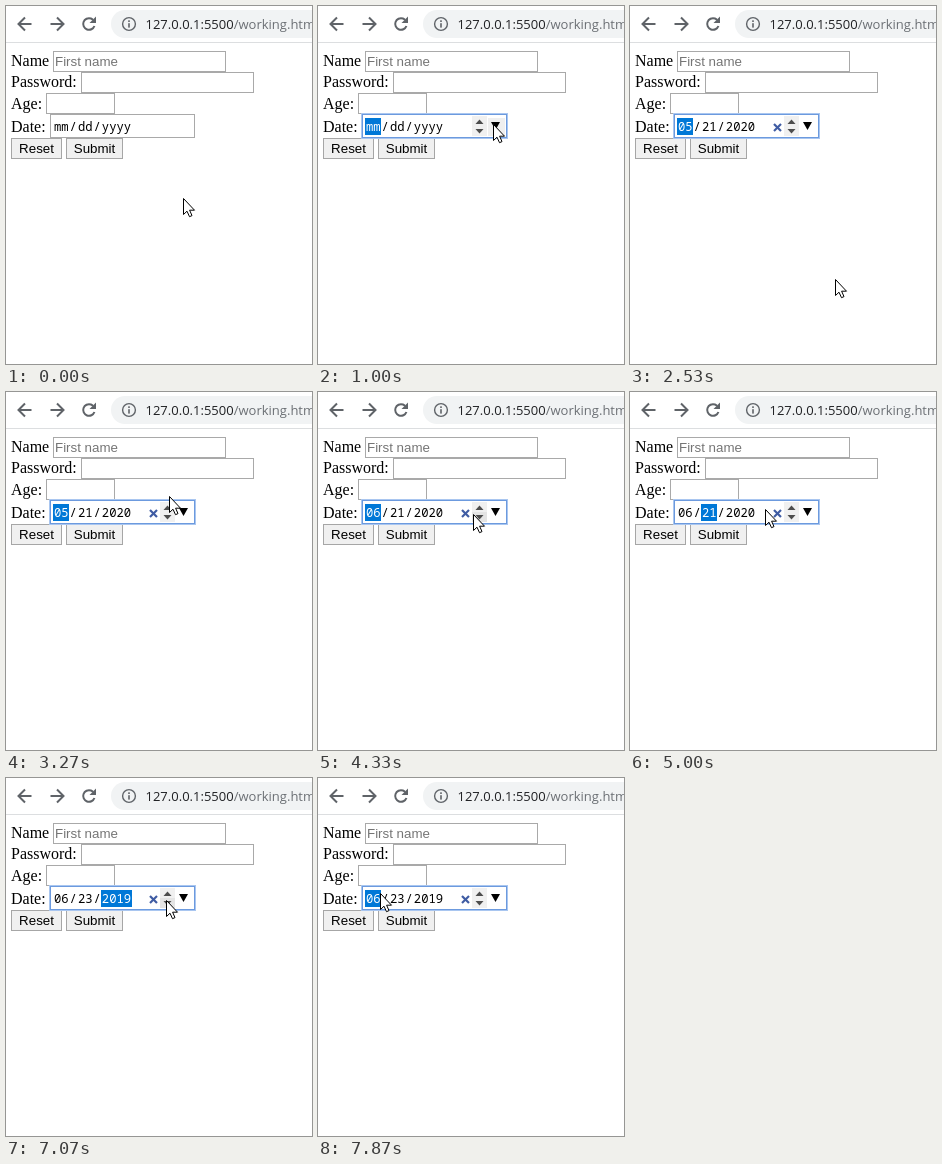
These frames come from a looping animation (306 px wide and 358 px high, 8 s). An HTML page with a canvas:

```html
<!DOCTYPE html>
<html lang="en">
<head>
<meta charset="utf-8">
<title>Date input</title>
<style>
html, body { margin: 0; width: 100%; height: 100%; overflow: hidden; background: #fff; }
canvas { display: block; width: 306px; height: 358px; }
</style>
</head>
<body>
<canvas id="stage" width="306" height="358"></canvas>
<script>
const ctx = document.getElementById('stage').getContext('2d');
const TICK = 200 / 3, TICKS = 120;
const SERIF = '16px "Liberation Serif", serif';
const SANS = '13.33px "Liberation Sans", sans-serif';
const SMALL = '12px "Liberation Sans", sans-serif';
const MONO = '12.2px "Noto Sans Mono", monospace';
const URL_FONT = '13px "Open Sans", sans-serif';
const INK = '#5f6368';

// Pointer strokes; each starts where the one before ended
const strokes = [
  { from: 0, to: 5, x: 171, y: 124 },
  { from: 8, to: 14, x: 175, y: 118 },
  { from: 20, to: 28, x: 198, y: 265 },
  { from: 28, to: 31, x: 205, y: 273 },
  { from: 42, to: 47, x: 164, y: 101 },
  { from: 48, to: 51, x: 160, y: 113 },
  { from: 60, to: 61, x: 160, y: 117 },
  { from: 64, to: 71, x: 75, y: 118, dip: 11 },
  { from: 72, to: 77, x: 167, y: 117 },
  { from: 80, to: 86, x: 161, y: 116 },
  { from: 89, to: 97, x: 114, y: 119 },
  { from: 99, to: 103, x: 160, y: 122 },
  { from: 106, to: 112, x: 66, y: 116, dip: 10 },
  { from: 116, to: 118, x: 62, y: 115 }
];
// What a click does follows from where the pointer is
const clicks = [14, 36, 54, 73, 81, 84, 98, 104, 117];
const OPEN_DELAY = 3, RELEASE = 2;

const inside = (p, x, y, w, h) => p.x >= x && p.x < x + w && p.y >= y && p.y < y + h;
const ease = u => u * u * (3 - 2 * u);

function pointerAt(tick) {
  let x = 177, y = 192;
  for (const s of strokes) {
    if (tick <= s.from) break;
    const u = Math.min(1, (tick - s.from) / (s.to - s.from));
    x += (s.x - x) * ease(u);
    y += (s.y - y) * ease(u) + (s.dip || 0) * Math.sin(Math.PI * u);
  }
  return { x: Math.round(x), y: Math.round(y) };
}

function stateAt(tick) {
  const state = { date: null, part: -1, open: false, picking: false, pressed: false };
  for (const t of clicks.filter(c => c <= tick)) {
    const p = pointerAt(t), age = tick - t;
    state.pressed = age < RELEASE;
    if (p.y > 132) {
      state.picking = state.pressed;
      state.open = state.pressed;
      if (!state.pressed) state.date = [5, 21, 2020];
    } else if (p.x >= 170) {
      state.part = 0;
      state.open = age >= OPEN_DELAY;
    } else if (p.x >= 154) {
      state.date[state.part] += p.y < 120 ? 1 : -1;
    } else {
      state.part = Math.min(2, Math.floor((p.x - 43) / 24));
    }
  }
  return state;
}

function rect(x, y, w, h, fill, border) {
  if (fill) { ctx.fillStyle = fill; ctx.fillRect(x, y, w, h); }
  if (border) {
    ctx.strokeStyle = border;
    ctx.lineWidth = 1;
    ctx.strokeRect(x + 0.5, y + 0.5, w - 1, h - 1);
  }
}

function text(str, x, y, font, color = '#000', align = 'left') {
  ctx.font = font;
  ctx.fillStyle = color;
  ctx.textAlign = align;
  ctx.fillText(str, x, y);
  return ctx.measureText(str).width;
}

function trace(points) {
  ctx.beginPath();
  points.forEach(([x, y]) => ctx.lineTo(x, y));
}

function poly(points, fill) {
  trace(points);
  ctx.closePath();
  ctx.fillStyle = fill;
  ctx.fill();
}

function line(points, color, width) {
  trace(points);
  ctx.strokeStyle = color;
  ctx.lineWidth = width;
  ctx.stroke();
}

// Triangles centred on x or y; a negative size flips them
const wedgeY = (x, y, half, h, fill) => poly([[x - half, y], [x + half, y], [x, y + h]], fill);
const wedgeX = (x, y, half, w, fill) => poly([[x, y - half], [x, y + half], [x + w, y]], fill);

function drawArrow(x, dir) {
  line([[x - 6.5 * dir, 18], [x + 6 * dir, 18]], INK, 2);
  line([[x, 11.5], [x + 6.5 * dir, 18], [x, 24.5]], INK, 2);
}

function drawToolbar() {
  drawArrow(19, -1);
  drawArrow(51, 1);

  ctx.beginPath();
  ctx.arc(83, 18, 5.8, 0.35, Math.PI * 1.75);
  ctx.stroke();
  poly([[90, 10.5], [90, 17], [83.5, 17]], INK);

  ctx.beginPath();
  ctx.roundRect(105, 4, 260, 28, 14);
  ctx.fillStyle = '#f1f3f4';
  ctx.fill();

  ctx.beginPath();
  ctx.arc(123, 18, 6.4, 0, Math.PI * 2);
  ctx.lineWidth = 1.4;
  ctx.stroke();
  rect(122.2, 14.3, 1.6, 1.7, INK);
  rect(122.2, 17.2, 1.6, 4.4, INK);

  const hostWidth = text('127.0.0.1:5500', 139.5, 23, URL_FONT, '#202124');
  text('/working.htm', 139.5 + hostWidth, 23, URL_FONT, '#6b6f74');
  rect(0, 36, 306, 1, '#dcdee0');
}

function drawButton(label, x, w) {
  rect(x, 132, w, 21, '#f0f0f0', '#a6a6a6');
  text(label, x + w / 2, 147, SANS, '#000', 'center');
}

function drawForm() {
  const border = '#a9a9a9';
  text('Name', 5, 60, SERIF);
  text('Password:', 5, 81, SERIF);
  text('Age:', 5, 103, SERIF);
  text('Date:', 5, 126, SERIF);
  rect(47, 45, 173, 21, '#fff', border);
  rect(75, 66, 173, 21, '#fff', border);
  rect(40, 87, 69, 21, '#fff', border);
  rect(44, 108, 145, 24, '#fff', border);
  text('First name', 49, 60, SANS, '#757575');
  drawButton('Reset', 5, 51);
  drawButton('Submit', 60, 57);
}

function drawDateText({ date, part }) {
  const parts = date
    ? date.map(n => String(n).padStart(2, '0'))
    : ['mm', 'dd', 'yyyy'];
  let x = 47;
  parts.forEach((str, i) => {
    ctx.font = MONO;
    const w = ctx.measureText(str).width + 2;
    if (i === part) rect(Math.round(x), 112, Math.floor(w), 17, '#0078d7');
    text(str, x + 1, 125, MONO, i === part ? '#fff' : '#000');
    x += w;
    if (i < 2) x += text('/', x, 125, MONO);
  });
}

function drawFieldControls(p, { date, open, pressed }) {
  if (date) {
    line([[144, 118], [151, 125]], '#3f5ca3', 2.2);
    line([[151, 118], [144, 125]], '#3f5ca3', 2.2);
  }
  for (const y of [110, 120]) {
    const hover = !open && inside(p, 154, y, 15, 10);
    rect(154, y, 15, 10, hover ? (pressed ? '#cfcfcf' : '#e4e4e4') : '#f0f0f0');
  }
  wedgeY(161.5, 118, 4, -4.5, '#4d4d4d');
  wedgeY(161.5, 123, 4, 4.5, '#4d4d4d');
  if (!open && inside(p, 170, 110, 17, 20)) rect(170, 112, 17, 18, '#efefef');
  wedgeY(177.5, 116, 4.5, 8, '#000');
}

function drawDateField(p, state) {
  const focused = state.part >= 0;
  if (focused) {
    rect(43, 107, 147, 26, null, '#a9c6f0');
    rect(44, 108, 145, 24, null, '#6c9ade');
  }
  drawDateText(state);
  if (focused || inside(p, 44, 108, 145, 24)) drawFieldControls(p, state);
}

function drawNavButton(x) {
  const g = ctx.createLinearGradient(0, 143, 0, 167);
  g.addColorStop(0.38, '#ededed');
  g.addColorStop(1, '#dedede');
  rect(x, 143, 24, 24, g, '#b8b8b8');
}

function drawCalendar(p, picking) {
  rect(44, 132, 262, 203, '#fff', '#ababab');
  text('May 2020', 60, 159, SMALL);
  wedgeY(122.5, 153, 3.5, 4, '#000');

  [215, 243, 271].forEach(drawNavButton);
  wedgeX(229, 155, 3.5, -4, '#6e6e6e');
  wedgeX(281, 155, 3.5, 4, '#6e6e6e');
  ctx.beginPath();
  ctx.arc(255, 155, 3, 0, Math.PI * 2);
  ctx.fill();

  rect(56, 178, 238, 25, '#f3f3f3');
  'Sun Mon Tue Wed Thu Fri Sat'.split(' ').forEach((day, i) =>
    text(day, 73 + i * 34, 194, SMALL, '#111', 'center'));

  for (let i = 0; i < 42; i++) {
    const x = 56 + (i % 7) * 34, y = 203 + Math.floor(i / 7) * 20;
    const day = new Date(2020, 3, 26 + i);
    const inMonth = day.getMonth() === 4;
    if (inside(p, x, y, 34, 20)) rect(x, y, 34, 20, picking ? '#bccdec' : '#e6ecf8');
    if (inMonth && day.getDate() === 12) rect(x, y, 34, 20, null, '#bdbdbd');
    text(day.getDate(), x + 17, y + 14, SMALL, inMonth ? '#000' : '#b8b8b8', 'center');
  }
  rect(55, 177, 240, 147, null, '#5f98ea');
}

function drawPointer({ x, y }) {
  const shape = [[0.5, 0.5], [0.5, 16.5], [4, 13.2], [6.5, 18.7], [9, 17.6], [6.6, 12.2], [11.5, 12.2]]
    .map(([dx, dy]) => [x + dx, y + dy]);
  poly(shape, '#fff');
  ctx.strokeStyle = '#000';
  ctx.lineWidth = 1;
  ctx.stroke();
}

function draw(tick) {
  const p = pointerAt(tick), state = stateAt(tick);
  rect(0, 0, 306, 358, '#fff');
  drawToolbar();
  drawForm();
  drawDateField(p, state);
  if (state.open) drawCalendar(p, state.picking);
  drawPointer(p);
}

const start = performance.now();
function loop() {
  const ms = (performance.now() - start) % (TICK * TICKS);
  draw(Math.floor((ms + 4) / TICK) % TICKS);
  requestAnimationFrame(loop);
}
loop();
</script>
</body>
</html>
```
